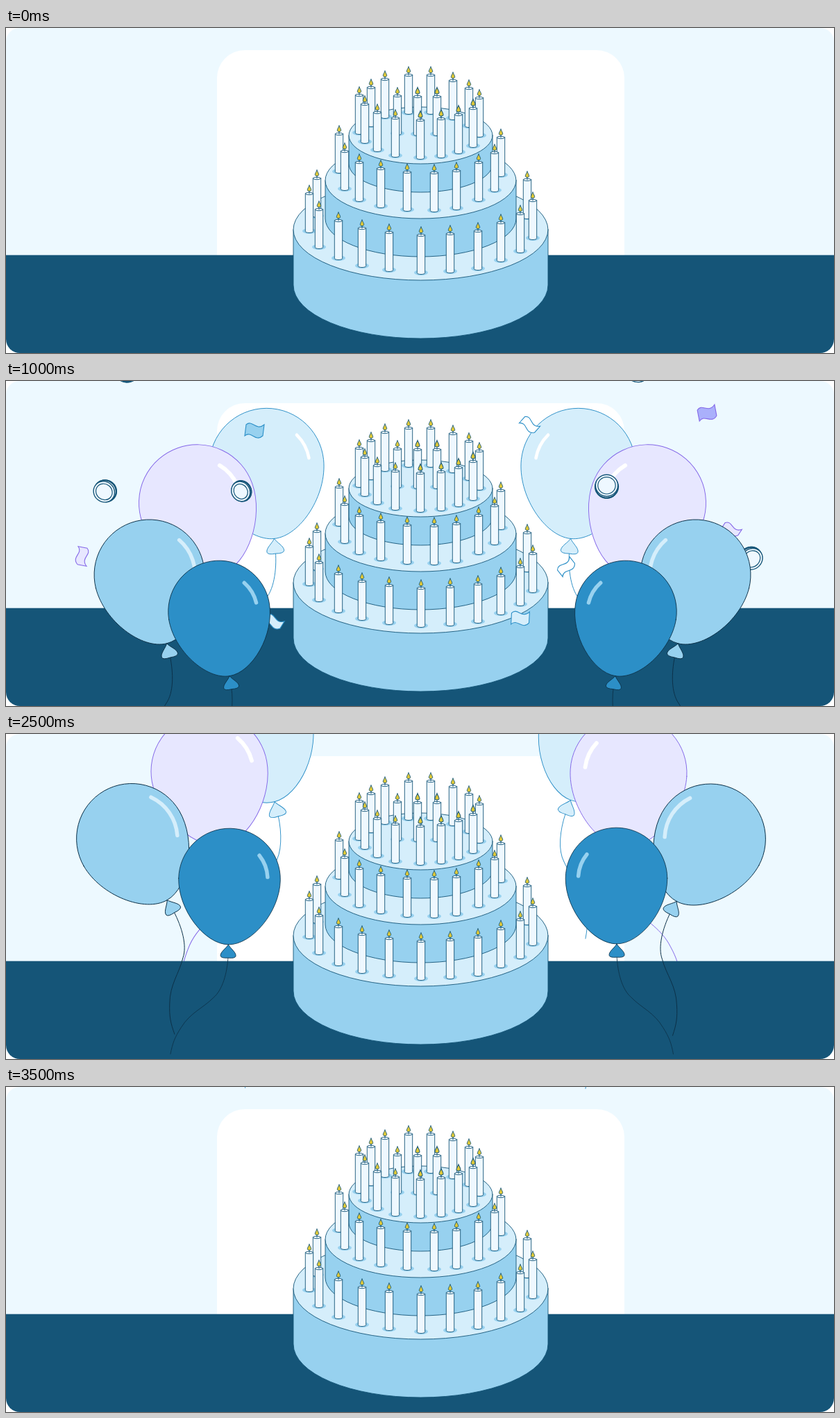
Recreate the animation shown at these times as an HTML page with a canvas. Size 1193 by 469 pixels, loop 3700 ms.

```html
<!DOCTYPE html>
<html lang="en">
<head>
<meta charset="utf-8">
<title>Birthday cake</title>
<style>
  html, body { margin: 0; width: 100%; height: 100%; overflow: hidden; background: #fff; }
  canvas { display: block; width: 1193px; height: 469px; border-radius: 20px; }
</style>
</head>
<body>
<canvas id="stage" width="1193" height="469"></canvas>
<script>
const NAVY = '#155578', INK = '#0d3148', BLUE = '#2c8fc7', SKY = '#97d1ef',
      PALE = '#d5eefb', ICE = '#eef8ff', LILAC = '#e7e7ff', VIOLET = '#8468e8';
const LOOP = 3700;

// Vertical offsets per step
const RISE = [400, 308, 270, 197, 107, 32];
const LIFT = [96, 152, 253, 389, 506, 570];
const FALL = [0, -61, -48, -28, 0, 36, 102, 187, 346];

const ctx = document.getElementById('stage').getContext('2d');

// Runs fn with the origin at x, y
function at(x, y, fn, deg = 0, sx = 1, sy = sx) {
  ctx.save();
  ctx.translate(x, y);
  ctx.rotate(deg * Math.PI / 180);
  ctx.scale(sx, sy);
  fn();
  ctx.restore();
}
function paint(shape, fill, line, width = .9) {
  const p = typeof shape === 'string' ? new Path2D(shape) : shape;
  if (fill) { ctx.fillStyle = fill; ctx.fill(p); }
  if (line) { ctx.strokeStyle = line; ctx.lineWidth = width; ctx.stroke(p); }
}
function oval(x, y, rx, ry) {
  const p = new Path2D();
  p.ellipse(x, y, rx, ry, 0, 0, Math.PI * 2);
  return p;
}

function room() {
  ctx.fillStyle = '#edf9ff';
  ctx.fillRect(0, 0, 1193, 469);
  ctx.fillStyle = '#fff';
  ctx.beginPath();
  ctx.roundRect(304, 32, 587, 360, 40);
  ctx.fill();
}
function table() {
  ctx.fillStyle = NAVY;
  ctx.fillRect(0, 327.7, 1193, 142);
}

// Cake
function tier(rx, ry, cy, depth, ryBase) {
  const cx = 597.5, l = cx - rx, r = cx + rx;
  paint(`M${l},${cy}V${cy + depth}A${rx},${ryBase} 0 0 0 ${r},${cy + depth}V${cy}Z`, SKY, NAVY);
  paint(oval(cx, cy, rx, ry), PALE, NAVY);
}
const CANDLES = [
  [[580, 68], [612, 68], [546, 74], [644, 76], [526, 86], [667, 87], [509, 97], [564, 98],
   [593, 99, 1], [621, 99, 1], [682, 101], [517, 110], [673, 116, 1], [535, 122], [652, 125, 1],
   [561, 130], [627, 131, 1], [597, 133, 1]],
  [[480, 153], [713, 158], [488, 178], [704, 180], [509, 194], [681, 194], [540, 203],
   [649, 206], [578, 208], [617, 209]],
  [[448, 217], [751, 219], [437, 239], [759, 249], [451, 262], [741, 268], [479, 278], [713, 281],
   [513, 289], [680, 293], [552, 295], [640, 297], [598, 299]]
];
const FLAME = 'M0,-12C1,-9 2.7,-7.4 2.7,-5.3C2.7,-2.9 -2.7,-2.9 -2.7,-5.3C-2.7,-7.4 -1,-9 0,-12Z';
function candle([x, y, big]) {
  at(x, y, () => {
    paint('M-5.7,0V54.5A5.7,2 0 0 0 5.7,54.5V0Z', ICE, NAVY);
    paint(oval(0, 0, 5.7, 1.7), ICE, NAVY);
    paint('M0,0V-4', null, NAVY);
    at(0, 0, () => paint(FLAME, '#dfc838', NAVY), 0, big ? 1.12 : 1);
  });
}
function cake() {
  tier(183.5, 73, 291, 80, 77);
  tier(137.5, 55, 220, 55, 55);
  tier(103.5, 41, 155, 41, 41);
  for (const ring of CANDLES) {
    for (const [x, y] of ring) paint(oval(x, y + 54, 10, 4), SKY);
    ring.forEach(candle);
  }
}

// Balloons: poses are [x, y, tilt]; the right side is mirrored
const FAR = [
  { r: 82.5, fill: PALE, line: BLUE, shine: '#fff', cap: 389,
    rest: [375.5, 94, 5.9], left: [360, 91, 14.7], right: [349, 92, 20.7] },
  { r: 84, fill: LILAC, line: VIOLET, shine: '#fff', wide: 5.5,
    rest: [275.5, 148, 19.6], left: [293, 150, 10.2], right: [303, 152, 3.5] }
];
const NEAR = [
  { r: 79.5, fill: SKY, line: INK, shine: PALE, arc: [.83, -35, 26], wide: 5.5,
    rest: [206.5, 247.5, 14.2], left: [181, 247, 30], right: [185, 247.5, 28.5] },
  { r: 73.3, fill: BLUE, line: INK, shine: SKY, wide: 6,
    rest: [307, 300.5, 9.2], left: [322, 305.5, -1], right: [320.5, 304.5, -.3] }
];
function balloon({ fill, line, shine, wide = 4.5, arc = [.75, -39.5, -4] }) {
  paint('M0,122C-1,148 -8,175 -22,187C-38,204 -58,211 -72,235C-82,251 -85,260 -88,277', null, line);
  paint('M-80,0A80,80 0 0 1 80,0C80,50 37,103 0,103C-37,103 -80,50 -80,0Z', fill, line);
  paint('M0,103C3,109 13,115 12,121Q11,125 0,124Q-11,125 -12,121C-13,115 -3,109 0,103Z', fill, line);
  const [k, from, to] = arc, glint = new Path2D();
  glint.arc(0, 0, 80 * k, from * Math.PI / 180, to * Math.PI / 180);
  paint(glint, null, shine, wide);
}
function flock(balloons, step, pace) {
  const rise = (RISE[step] || 0) * pace, lift = step > 10 ? LIFT[step - 11] : 0;
  for (const b of balloons) {
    for (const side of ['left', 'right']) {
      const [x, y, tilt] = step < 10 ? b.rest : b[side];
      const top = y + rise - Math.min(lift, b.cap || lift);
      const place = () => at(x, top, () => balloon(b), -tilt, b.r / 80);
      if (side === 'left') place();
      else at(1200, 0, place, 0, -1, 1);
    }
  }
}

// Confetti
const flag = (fill, line, rot, h = 8) => () => at(0, 0, () =>
  paint(`M-12,${-h}C-3,${-h - 8} 2,${-h + 10} 14,${-h}L12,${h}C1,${h + 10} -4,${h - 8} -14,${h}Z`,
    fill, line, 1.1), rot);

const coin = (rot, rx, ry, dx, dy) => () => {
  const ring = (k, inset, fill, width) =>
    at(dx * k, dy * k, () => paint(oval(0, 0, rx - inset, ry - inset), fill, NAVY, width), rot);
  ring(.5, 0, '#fff', 1);
  ctx.setLineDash([1.4, 1.1]);
  ring(.2, 0, null, 2.2);
  ctx.setLineDash([]);
  ring(-.4, .4, ICE, 1.4);
  ring(-.4, 3.8, ICE, 1.2);
};

// First wave is placed where it hangs at step 4, second wave at step 7
const BITS = [
  { x: 358, y: 35, draw: flag(SKY, BLUE, 0) },
  { x: 754.5, y: 27, draw: flag('#fff', BLUE, 32, 6) },
  { x: 1010, y: 10, draw: flag('#aab0fb', VIOLET, -18) },
  { x: 110, y: 217, draw: flag(LILAC, VIOLET, 92, 6.5) },
  { x: 1040, y: 197.5, dx: 28, k: .45, draw: flag(LILAC, VIOLET, 22, 5) },
  { x: 386, y: 311, draw: flag(PALE, BLUE, 22, 6) },
  { x: 807, y: 232, draw: flag('#fff', BLUE, -48, 6) },
  { x: 741, y: 306, draw: flag(PALE, BLUE, -4) },
  { x: 142.5, y: 83.5, k: 2.1, draw: coin(40, 16, 15, 3, -2) },
  { x: 339, y: 123, draw: coin(60, 15, 13.5, 2, -1) },
  { x: 865.5, y: 116, draw: coin(0, 16.5, 16, 0, 3) },
  { x: 1073.5, y: 220, draw: coin(-45, 16.5, 15, -3, -2) },
  { x: 307, y: 119, late: true, draw: flag('#fff', BLUE, 28, 6) },
  { x: 691, y: 109, late: true, draw: flag(SKY, BLUE, 38, 6) },
  { x: 175.5, y: 136, late: true, draw: coin(-12, 17.5, 15.5, -1, 3) },
  { x: 401.5, y: 133, late: true, draw: coin(-65, 15.5, 13.5, -2.5, 1) },
  { x: 908, y: 137, late: true, draw: coin(28, 18, 14, 2, -2.5) }
];
function confetti(step) {
  if (!step || step >= FALL.length) return;
  const fall = FALL[step];
  for (const { x, y, dx = 0, k = 1, late, draw } of BITS) {
    const off = late ? fall - 187 : fall > 0 ? fall * k : fall;
    const drift = dx * Math.max(0, Math.min(1, fall / 187));
    at(x + drift, y + off, draw);
  }
}

function stepAt(t) {
  if (t < 2000) return Math.floor(t / 200);
  return t < 2500 ? 10 : 11 + Math.floor((t - 2500) / 200);
}

function render(step) {
  room();
  flock(FAR, step, .87);
  table();
  cake();
  confetti(step);
  flock(NEAR, step, 1);
}

ctx.lineCap = 'round';
let shown = -1;
function tick() {
  const step = stepAt(performance.now() % LOOP);
  if (step !== shown) render(shown = step);
  requestAnimationFrame(tick);
}
tick();
</script>
</body>
</html>
```
